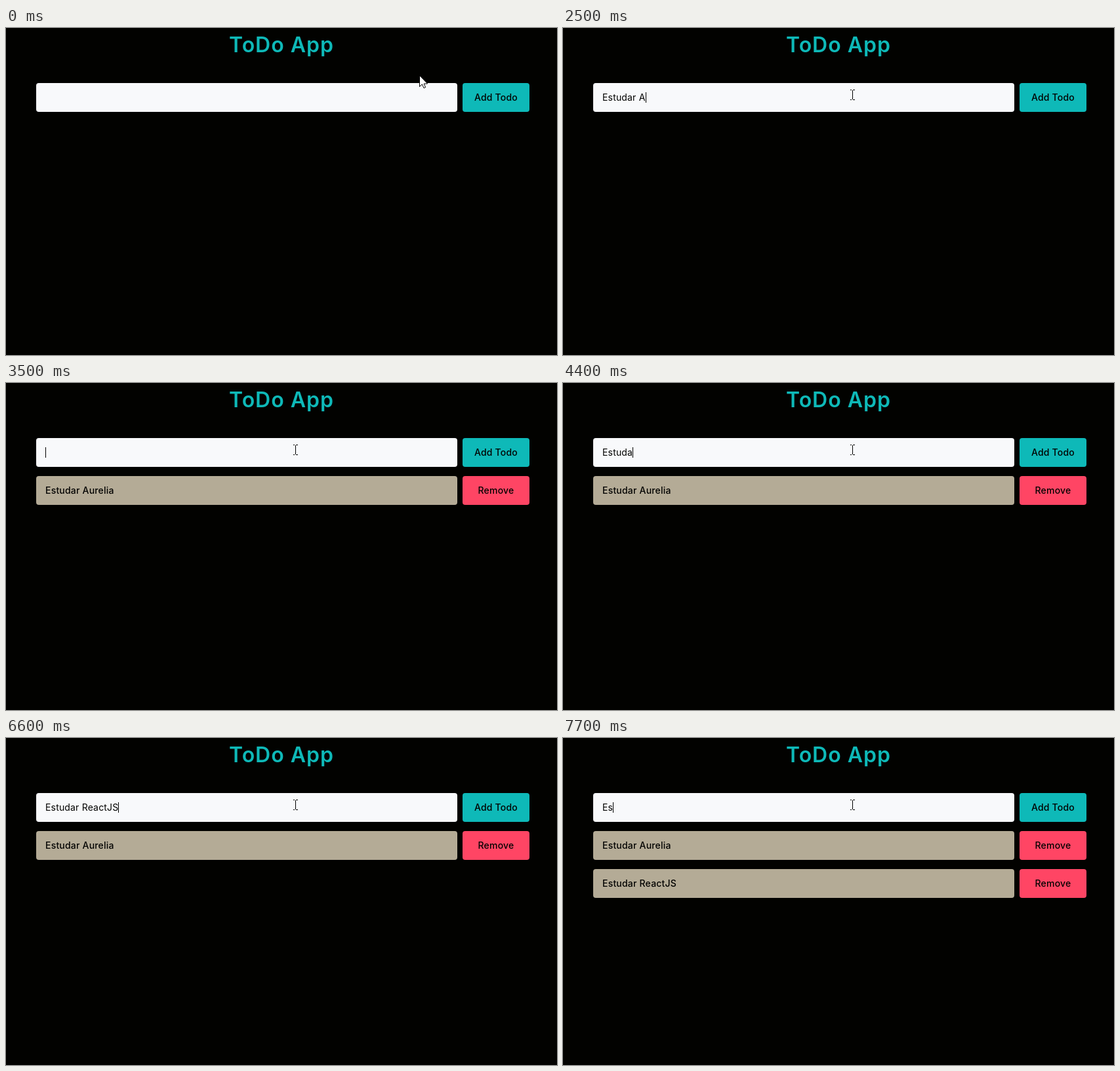
Animation of 840 by 499 pixels, one loop 8000 ms. Source, as an HTML page:

```html
<!DOCTYPE html>
<html lang="pt">
<head>
<meta charset="utf-8">
<title>ToDo App</title>
<style>
  html, body { margin: 0; width: 100%; height: 100%; overflow: hidden; background: #020200; }
  svg { display: block; width: 840px; height: 499px; }
  text { font: 500 14px Inter, "Open Sans", sans-serif; letter-spacing: .2px; fill: #020200; white-space: pre; }
  .title { font-size: 32px; font-weight: 600; letter-spacing: 1px; fill: #0eb9b8; }
  .label { text-anchor: middle; }
  #typed { font-weight: 400; letter-spacing: .17px; }
  .field { fill: #f8f9fb; }
  .add { fill: #0eb9b8; }
  .item { fill: #b4ab96; }
  .remove { fill: #ff4564; }
</style>
</head>
<body>
<svg viewBox="0 0 840 499">
  <text class="title" x="340" y="36.5">ToDo App</text>
  <rect class="field" x="46" y="84" width="642" height="44" rx="4"/>
  <rect class="add" x="696" y="84" width="102" height="44" rx="4"/>
  <text class="label" x="747" y="111">Add Todo</text>
  <text id="typed" x="60" y="111"></text>
  <rect id="caret" y="98" width="1" height="16"/>

  <g class="row">
    <rect class="item" x="46" y="142" width="642" height="44" rx="4"/>
    <rect class="remove" x="696" y="142" width="102" height="44" rx="4"/>
    <text x="60" y="169">Estudar Aurelia</text>
    <text class="label" x="747" y="169">Remove</text>
  </g>
  <g class="row">
    <rect class="item" x="46" y="200" width="642" height="44" rx="4"/>
    <rect class="remove" x="696" y="200" width="102" height="44" rx="4"/>
    <text x="60" y="227">Estudar ReactJS</text>
    <text class="label" x="747" y="227">Remove</text>
  </g>

  <path id="arrow" d="M-.5-.5V16.5L3.4 12.8 6 18.6 8.6 17.5 6.1 12H11.6Z" fill="#fff" stroke="#000"/>
  <path id="beam" d="M-3-7.5H-1M1-7.5H4M-3 7.5H-1M1 7.5H4M.5-7V7" fill="none" stroke="#000"/>
</svg>
<script>
  const LOOP = 8000;
  const $ = id => document.getElementById(id);
  const rows = document.querySelectorAll('.row');

  // One entry per todo: its text, the time of each keystroke, and the time it is added.
  const todos = [
    { text: 'Estudar Aurelia', added: 3500,
      keys: [600, 800, 1100, 1400, 1500, 1600, 2000, 2100, 2500, 2800, 2900, 3000, 3000, 3200, 3300] },
    { text: 'Estudar ReactJS', added: 6800,
      keys: [3700, 3900, 4200, 4300, 4400, 4400, 4600, 4700, 5200, 5500, 5800, 5900, 6100, 6400, 6600] },
    { text: 'Es', added: LOOP, keys: [7500, 7700] }
  ];

  // Pointer position, one point every 100 ms.
  const moves = [[631, 73], [580, 86], [505, 89], [459, 92], [441, 102]];

  const show = (el, on) => el.setAttribute('visibility', on ? 'visible' : 'hidden');

  function drawPointer(t) {
    const [x, y] = moves[Math.min(Math.floor(t / 100), moves.length - 1)];
    const inField = y >= 84;
    show($('arrow'), !inField);
    show($('beam'), inField);
    for (const id of ['arrow', 'beam']) $(id).setAttribute('transform', `translate(${x} ${y})`);
  }

  function drawInput(t) {
    const todo = todos.find(d => t < d.added);
    const text = todo.text.slice(0, todo.keys.filter(k => k <= t).length);
    const typed = $('typed');
    if (typed.textContent !== text) typed.textContent = text;
    const width = text ? typed.getComputedTextLength() : 0;
    $('caret').setAttribute('x', Math.round(60 + width));
    const blinkedOff = t >= 7300 && t < 7500;
    show($('caret'), t >= 500 && !blinkedOff);
  }

  function draw() {
    const t = performance.now() % LOOP;
    drawPointer(t);
    drawInput(t);
    rows.forEach((row, i) => show(row, t >= todos[i].added));
    requestAnimationFrame(draw);
  }
  draw();
</script>
</body>
</html>
```
